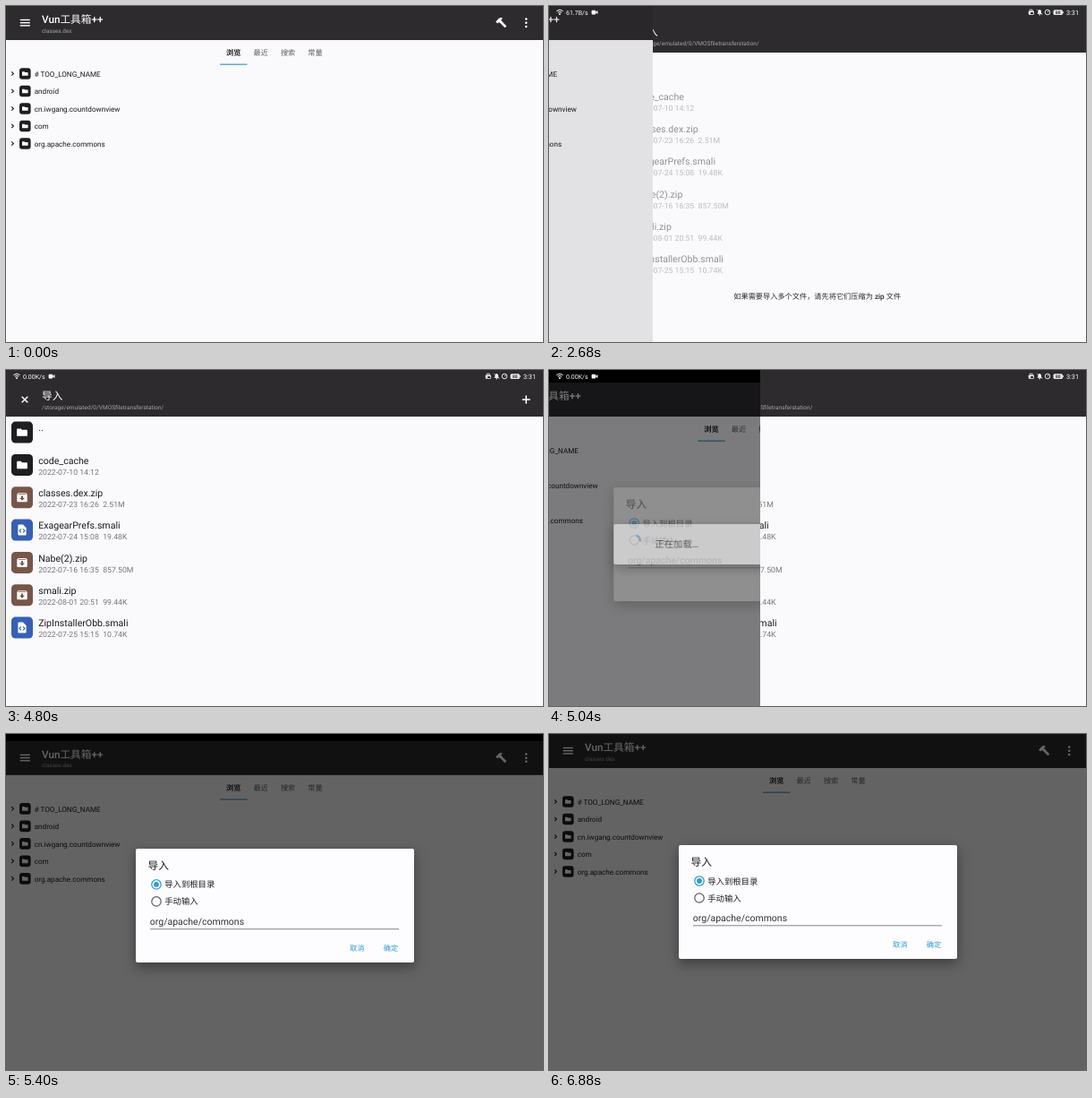
An HTML page for the animation above (8 s loop, 600 px wide and 375 px high).

```html
<!DOCTYPE html>
<html lang="zh-CN">
<head>
<meta charset="utf-8">
<title>Import</title>
<style>
html, body { margin: 0; width: 100%; height: 100%; overflow: hidden; background: #faf9fc; }
div, svg { position: absolute; left: 0; top: 0; }
#stage { width: 600px; height: 375px; overflow: hidden; background: #faf9fc; }
svg { width: 600px; height: 375px; overflow: visible; }
text { font-family: Roboto, "Noto Sans CJK SC", "Noto Sans CJK", "Noto Sans", sans-serif; white-space: pre; text-rendering: geometricPrecision; }
.page { width: 600px; height: 375px; }
.anim { animation: 8s infinite cubic-bezier(.4, 0, .2, 1); }

/* Editor page */
#editorX { animation-name: editorX; background: #000; }
#editorY { animation-name: editorY; height: 400px; background: #faf9fc; }
.dim { width: 760px; height: 400px; background: rgba(0,0,0,.6); }
#shade { animation-name: shade; }
@keyframes editorX { 0%, 30.1% { transform: none } 36.6%, 61% { transform: translateX(-120px) } 67.5%, 100% { transform: none } }
@keyframes editorY { 0%, 38% { transform: none } 38.01%, 66.5% { transform: translateY(14px) } 69.6%, 100% { transform: none } }
@keyframes shade { 0%, 30.1% { opacity: 0 } 36.6%, 38% { opacity: .2 } 38.01%, 100% { opacity: 0 } }

/* Context menu */
#menu { top: 161px; width: 118px; height: 170px; background: #faf9fc; border-radius: 0 2px 2px 0; transform-origin: 0 0;
  box-shadow: 0 5px 8px rgba(0,0,0,.2), 0 0 2px rgba(0,0,0,.22); animation-name: menu; }
#menu svg { top: -161px; }
@keyframes menu { 0%, 6.5% { opacity: 0; transform: scale(.85) } 9%, 29% { opacity: 1; transform: none } 30.5%, 100% { opacity: 0; transform: none } }

/* Dialogs: each card has its own dim layer */
.dialog { animation-name: dialogY; }
.card { left: 144.5px; width: 311px; background: #fdfcfe; border-radius: 2px; box-shadow: 0 5px 14px rgba(0,0,0,.4); }
.card svg { left: -144.5px; }
.ask { animation-name: ask; }
.load { animation-name: load; }
.card.ask { top: 124px; height: 127px; }
.card.ask svg { top: -124px; }
.card.load { top: 165px; height: 45px; }
.card.load svg { top: -165px; }
#arc { transform-origin: 169px 183px; animation: spin 1s linear infinite; }
@keyframes dialogY { 0%, 38% { transform: none } 38.01%, 66.5% { transform: translateY(7px) } 69.6%, 100% { transform: none } }
@keyframes ask { 0%, 61.7% { opacity: 0 } 65.7%, 100% { opacity: 1 } }
@keyframes load { 0%, 58.5% { opacity: 0 } 60%, 61.7% { opacity: 1 } 65.7%, 100% { opacity: 0 } }
@keyframes spin { to { transform: rotate(360deg) } }

/* File page */
#filesX { overflow: hidden; animation-name: filesX; }
#files { background: #faf9fc; animation-name: files; }
#list { animation-name: list; }
@keyframes filesX { 0%, 30.1% { transform: translateX(600px) } 36.6%, 61% { transform: none } 67.5%, 100% { transform: translateX(600px) } }
@keyframes files { 0%, 30.1% { transform: translateX(-300px) } 36.6%, 61% { transform: none } 67.5%, 100% { transform: translateX(-300px) } }
@keyframes list { 0%, 32% { opacity: 0 } 36.5%, 100% { opacity: 1 } }

/* Ripples and touches */
.clip { overflow: hidden; }
.clip div { border-radius: 50%; background: rgba(30,28,34,.05); animation-timing-function: linear; }
#fileTap { top: 234px; width: 600px; height: 33px; }
#fileTap div { left: -390px; top: -481px; width: 1000px; height: 1000px; animation-name: fileTap; }
#menuTap { top: 58px; width: 118px; height: 29px; }
#menuTap div { left: -9px; top: -59px; width: 160px; height: 160px; animation-name: menuTap; }
@keyframes fileTap { 0%, 45.5% { transform: scale(0) } 53% { transform: none; opacity: 1 } 54% { opacity: 1 } 55.5%, 100% { opacity: 0 } }
@keyframes menuTap { 0%, 20.5% { transform: scale(0) } 24.5%, 100% { transform: none } }
.touch { width: 13px; height: 13px; margin: -7px; border: .7px solid #aaa9ae; border-radius: 50%; background: rgba(225,224,229,.3); }
@keyframes touch1 { 0%, .5% { opacity: 0 } 2%, 13% { opacity: 1 } 16%, 100% { opacity: 0 } }
@keyframes touch2 { 0%, 20.3% { opacity: 0 } 20.5%, 29% { opacity: 1 } 30%, 100% { opacity: 0 } }
@keyframes touch3 { 0%, 45.5% { opacity: 0 } 46.5%, 54% { opacity: 1 } 55.5%, 100% { opacity: 0 } }

/* Overlays */
#toast { animation-name: toast; }
#status { animation-name: status; }
#rateA { animation-name: rateA; }
#rateB { animation-name: rateB; }
@keyframes toast { 0%, 31% { opacity: 0 } 32.5%, 53.5% { opacity: 1 } 55.5%, 100% { opacity: 0 } }
@keyframes status { 0%, 30% { opacity: 0 } 31.5%, 66% { opacity: 1 } 67.3%, 100% { opacity: 0 } }
@keyframes rateA { 0%, 56% { opacity: 1 } 56.01%, 100% { opacity: 0 } }
@keyframes rateB { 0%, 56% { opacity: 0 } 56.01%, 100% { opacity: 1 } }
</style>
</head>
<body>
<div id="stage">
  <div id="editorX" class="page anim">
    <div id="editorY" class="page anim">
      <svg id="editor"></svg>
      <div id="menu" class="anim">
        <div id="menuTap" class="clip"><div class="anim"></div></div>
        <svg id="menuText"></svg>
      </div>
    </div>
    <div id="shade" class="dim anim"></div>
    <div class="dim ask anim"></div>
    <div class="dialog page anim"><div class="card ask anim"><svg id="askBody"></svg></div></div>
    <div class="dim load anim"></div>
    <div class="dialog page anim"><div class="card load anim"><svg id="loadBody"></svg></div></div>
  </div>
  <div id="filesX" class="page anim">
    <div id="files" class="page anim">
      <div id="fileTap" class="clip"><div class="anim"></div></div>
      <svg id="filesBody"></svg>
    </div>
  </div>
  <svg id="overlay"></svg>
  <div class="touch anim" style="left:62px;top:157px;animation-name:touch1"></div>
  <div class="touch anim" style="left:71px;top:240px;animation-name:touch2"></div>
  <div class="touch anim" style="left:110px;top:253.5px;animation-name:touch3"></div>
</div>
<script>
const INK = '#1c1b1e', BAR = '#2d2b2e', BLUE = '#2f9bd8', MEDIUM = 'font-weight="500"';

const put = (id, ...parts) => { document.getElementById(id).innerHTML = parts.flat().join(''); };
const text = (x, y, size, str, fill = INK, extra = '') =>
  `<text x="${x}" y="${y}" font-size="${size}" fill="${fill}" ${extra}>${str}</text>`;
const rect = (x, y, w, h, fill, r = 0) =>
  `<rect x="${x}" y="${y}" width="${w}" height="${h}" rx="${r}" fill="${fill}"/>`;
const line = (d, color, width = 1) => `<path d="${d}" fill="none" stroke="${color}" stroke-width="${width}"/>`;
const shape = (d, fill = '#fff') => `<path d="${d}" fill="${fill}"/>`;
const dot = (x, y, r, fill) => `<circle cx="${x}" cy="${y}" r="${r}" fill="${fill}"/>`;
const ring = (x, y, r, color, width) =>
  `<circle cx="${x}" cy="${y}" r="${r}" fill="none" stroke="${color}" stroke-width="${width}"/>`;
const at = (x, y, scale, body) => `<g transform="translate(${x} ${y}) scale(${scale})">${body}</g>`;

const folder = shape('M-5 -4.2h3.6l1.3 1.4h5.1q.9 0 .9 .9v5.2q0 .9-.9 .9h-10q-.9 0-.9-.9v-6.6q0-.9 .9-.9z');
const archive = shape('M-4.5 -5h9l1.2 1.7v7.3q0 1-1 1h-9.4q-1 0-1-1v-7.3z')
  + shape('M-4 -4h8l.5 .8h-9z M-1.1 -1.7h2.2v2.2h1.9l-3 3-3-3h1.9z', '#77564a');
const code = shape('M-4.6 -5q0-1 1-1h4.6l3.6 3.6v7.4q0 1-1 1h-7.2q-1 0-1-1z')
  + line('M-1 -1.2l-2 2 2 2M1 -1.2l2 2-2 2', '#3560b5', 1.1);

// Editor page
put('editor',
  rect(0, 0, 600, 38, BAR),
  [15.5, 18.7, 21.9].map(y => rect(15.8, y - .7, 11, 1.4, '#fff')),
  text(40, 19, 11.7, 'Vun工具箱++', '#fff', MEDIUM),
  text(40, 29.6, 6.4, 'classes.dex', '#a5a4a7'),
  shape('M547.2 17.6l3.6-3.8q2-1.4 4.2-.2l-1.8 1.8 .7 1.4 5.4 5.6-1.9 1.9-5.5-5.5-1.4-.6-1.4 1.4z'),
  [14.6, 18.8, 23].map(y => dot(581.2, y, 1.25, '#fff')),
  ['浏览', '最近', '搜索', '常量'].map((s, i) =>
    text(254.3 + 30.4 * i, 54.9, 8.2, s, i ? '#5f5e62' : INK, `text-anchor="middle" font-weight="${i ? 500 : 700}"`)),
  rect(239, 64.5, 30.5, 1.4, '#5aa5d2'),
  ['# TOO_LONG_NAME', 'android', 'cn.iwgang.countdownview', 'com', 'org.apache.commons'].map((s, i) => {
    const y = 75.5 + 19.5 * i;
    return line(`M6.2 ${y - 2.2}l2.2 2.2-2.2 2.2`, INK, 1.1) + rect(15, y - 6.3, 12.6, 12.6, '#201e21', 3)
      + at(21.3, y, .56, folder) + text(31.7, y + 3.2, 8.15, s);
  }));

put('menuText', ['搜索', '添加', '导入', '删除', '重命名', '批量操作'].map((s, i) =>
  text(9.2, 181.2 + 28.1 * i, 9.4, s, INK, MEDIUM)));

// Dialogs
put('askBody',
  text(158.5, 147.2, 11.7, '导入', INK, MEDIUM),
  ring(168, 164, 5.2, BLUE, 1.3), dot(168, 164, 2.9, BLUE),
  ring(168, 183, 5.2, '#5c5b5f', 1.2),
  text(177.2, 167.5, 9.35, '导入到根目录', INK, MEDIUM),
  text(177.2, 186.5, 9.35, '手动输入', INK, MEDIUM),
  text(160.8, 209.4, 10.5, 'org/apache/commons', '#333236'),
  rect(161, 213.4, 278, .9, '#77767a'),
  text(384, 238, 8.2, '取消', BLUE, MEDIUM),
  text(421.8, 238, 8.2, '确定', BLUE, MEDIUM));

put('loadBody',
  `<g id="arc">${line('M169 177.2a5.8 5.8 0 0 1 5.8 5.8', BLUE, 1.4)}</g>`,
  text(191, 191.2, 10.4, '正在加载…', '#333236', MEDIUM));

// File page
const FILES = [
  ['..', '', 'dir'],
  ['code_cache', '2022-07-10 14:12', 'dir'],
  ['classes.dex.zip', '2022-07-23 16:26  2.51M', 'zip'],
  ['ExagearPrefs.smali', '2022-07-24 15:08  19.48K', 'code'],
  ['Nabe(2).zip', '2022-07-16 16:35  857.50M', 'zip'],
  ['smali.zip', '2022-08-01 20:51  99.44K', 'zip'],
  ['ZipInstallerObb.smali', '2022-07-25 15:15  10.74K', 'code']
];
const KIND = { dir: ['#1f1e20', folder], zip: ['#77564a', archive], code: ['#3560b5', code] };

put('filesBody',
  rect(0, 0, 600, 52, BAR),
  line('M17.7 29.7l6.6 6.6M24.3 29.7l-6.6 6.6', '#fff', 1.5),
  text(40, 33.2, 11.7, '导入', '#fff', MEDIUM),
  text(40, 43.9, 6.55, '/storage/emulated/0/VMOSfiletransferstation/', '#a5a4a7'),
  line('M576.7 33h9M581.2 28.5v9', '#fff', 1.6),
  '<g id="list" class="anim">',
  FILES.map(([name, info, kind], i) => {
    const y = 69.6 + 36.33 * i, [color, icon] = KIND[kind];
    return rect(6, y - 12, 24, 24, color, 4.5) + at(18, y, 1, icon)
      + text(36.2, y - 1.2, 10.6, name) + text(36.2, y + 10.9, 8.7, info, '#77767b');
  }),
  '</g>');

// Toast and status bar
put('overlay',
  `<g id="toast" class="anim">${text(206.3, 326.7, 8.2, '如果需要导入多个文件，请先将它们压缩为 zip 文件', '#2a292c', MEDIUM)}</g>`,
  '<g id="status" class="anim">',
  line('M8.4 5.6q3.6-3 7.2 0M9.8 7.3q2.2-1.8 4.4 0', '#fff', 1), dot(12, 9, 1, '#fff'),
  `<g id="rateA" class="anim">${text(19, 9.5, 7, '61.7B/s', '#fff')}</g>`,
  `<g id="rateB" class="anim">${text(19, 9.5, 7, '0.00K/s', '#fff')}</g>`,
  rect(47.6, 4.8, 4.6, 4.6, '#fff', .9), shape('M52.4 6.5l2-1.4v4l-2-1.4z'),
  rect(535.8, 5.4, 6, 4.4, '#fff', .8), line('M537.2 5.2v-1h3v1', '#fff', .8), rect(538, 7, 3, 2, BAR),
  shape('M545.4 8.8l1-1.2v-1.4q.2-2 1.8-2.2 1.7 .2 1.8 2.2v1.4l1 1.2z'), dot(548.2, 9.7, .8, '#fff'),
  line('M545.2 3.8l6 6', '#fff', .7),
  ring(557, 7, 2.8, '#fff', .9), line('M557 7l1.5-1.5', '#fff', .9),
  rect(563.5, 4.3, 10.4, 5.6, '#e6e5e8', 1.5), rect(574.2, 6, .8, 2.2, '#e6e5e8'),
  text(568.7, 8.9, 4.8, '80', BAR, 'text-anchor="middle" font-weight="700"'),
  text(578, 9.6, 7.3, '3:31', '#fff'),
  '</g>');
</script>
</body>
</html>
```
